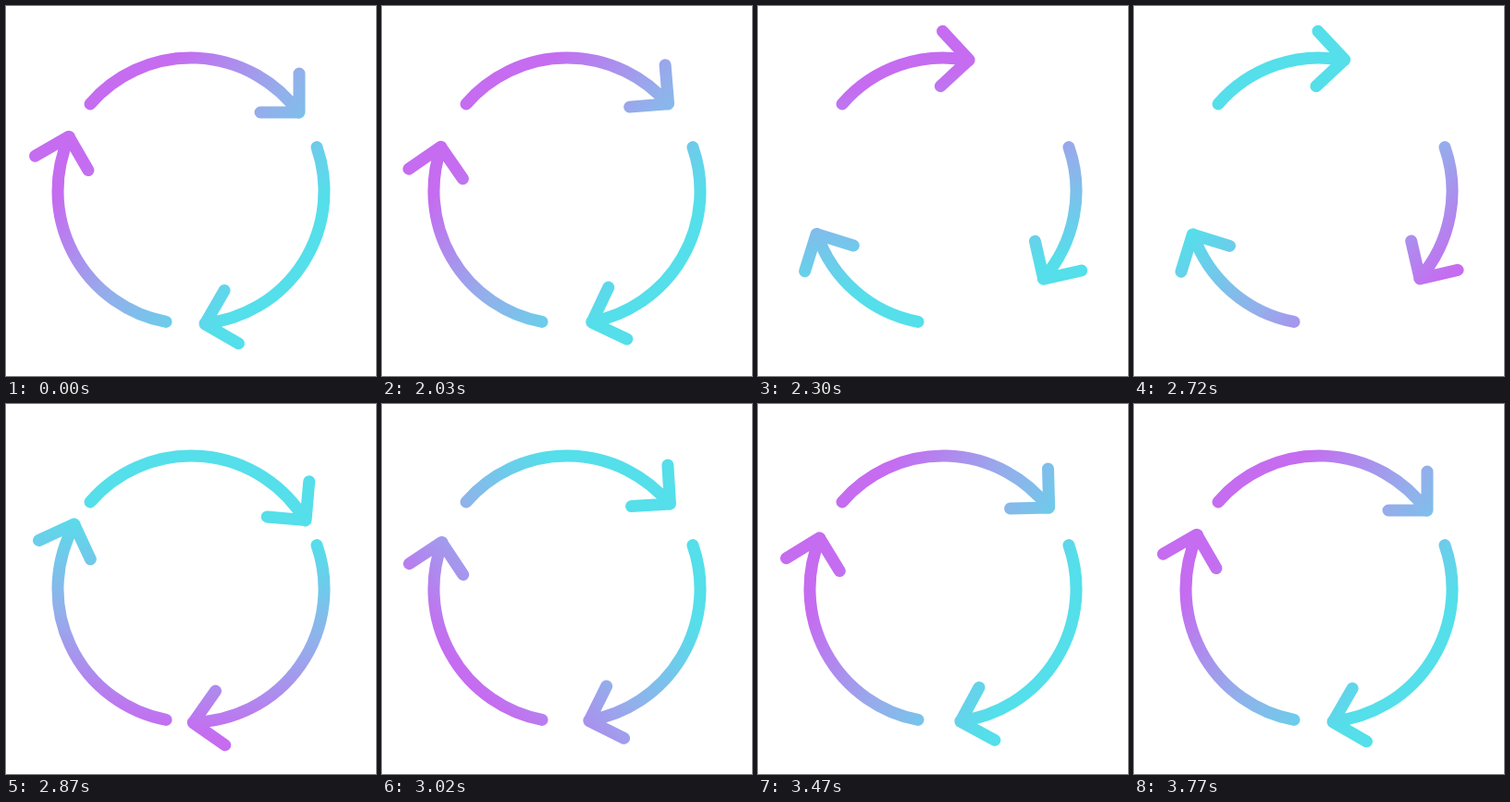
Animation, 400 px wide and 400 px high, one loop 3.83 s. Source, as an HTML page:

```html
<!DOCTYPE html>
<html lang="en">
<head>
<meta charset="utf-8">
<title>Cycle arrows</title>
<style>
  html, body { margin: 0; width: 100%; height: 100%; overflow: hidden; background: #fff; }
  svg { display: block; width: 100%; height: 100%; }
</style>
</head>
<body>
<svg viewBox="0 0 400 400">
  <defs>
    <linearGradient id="tint" gradientUnits="userSpaceOnUse">
      <stop offset="0" stop-color="#c56cf0"/>
      <stop offset=".5" stop-color="#93afeb"/>
      <stop offset="1" stop-color="#54dfea"/>
    </linearGradient>
  </defs>
  <path id="arrows" fill="none" stroke="url(#tint)" stroke-width="13" stroke-linecap="round" stroke-linejoin="round"/>
</svg>
<script>
const LOOP = 3830, HOLD = 2000, STEP = 30, LAST = 59;
const CENTER = 200, RADIUS = 144, TAIL = -139.2, TIP = -36;
const HEAD = [[117, -127], [117, -85], [75, -85]];

const tint = document.getElementById('tint');
const arrows = document.getElementById('arrows');
const rad = deg => deg * Math.PI / 180;
const smooth = (from, to, u) => from + (to - from) * (1 - Math.cos(Math.PI * u)) / 2;

function bezier(x1, y1, x2, y2) {
  const at = (a, b, s) => 3 * (1 - s) ** 2 * s * a + 3 * (1 - s) * s * s * b + s ** 3;
  return u => {
    let lo = 0, hi = 1;
    for (let i = 0; i < 24; i++) {
      const mid = (lo + hi) / 2;
      if (at(x1, x2, mid) < u) lo = mid; else hi = mid;
    }
    return at(y1, y2, (lo + hi) / 2);
  };
}
const pullEase = bezier(.167, .167, .112, 1);
const turnEase = bezier(.3, 0, .42, 1);

// Degrees the heads are away from rest: pull back, spring forward, settle.
function swing(n) {
  if (n <= 0) return 0;
  if (n < 17) return -46.5 * pullEase(n / 17);
  if (n < 24) return smooth(-46.5, -43, (n - 17) / 7);
  if (n < 30) return smooth(-43, 8.5, (n - 24) / 6);
  const d = Math.min(n - 27, 27);
  return 9.6 * (1 - d / 27) * Math.sin(Math.PI * d / 6);
}

function rotated([x, y], deg) {
  const c = Math.cos(rad(deg)), s = Math.sin(rad(deg));
  return (CENTER + x * c - y * s).toFixed(2) + ' ' + (CENTER + x * s + y * c).toFixed(2);
}

function arrow(turn, offset) {
  const tail = rotated([RADIUS, 0], TAIL + turn);
  const tip = rotated([RADIUS, 0], TIP + turn + offset);
  const head = HEAD.map(p => rotated(p, turn + offset)).join('L');
  return `M${tail}A${RADIUS} ${RADIUS} 0 0 1 ${tip}M${head}`;
}

function setTint(n) {
  const r = n <= 0 ? 0 : n >= LAST ? 1 : turnEase(n / LAST);
  const angle = rad(40 + 360 * r);
  const mid = 5 - 55 * Math.sin(Math.PI * r);
  [mid - 112, mid + 112].forEach((d, i) => {
    tint.setAttribute('x' + (i + 1), CENTER + d * Math.cos(angle));
    tint.setAttribute('y' + (i + 1), CENTER + d * Math.sin(angle));
  });
}

function draw(time) {
  const n = Math.min(LAST, Math.max(0, Math.floor((time % LOOP - HOLD) / STEP)));
  const offset = swing(n);
  arrows.setAttribute('d', [0, 120, 240].map(turn => arrow(turn, offset)).join(''));
  setTint(n);
}

const start = performance.now();
function tick() {
  draw(performance.now() - start);
  requestAnimationFrame(tick);
}
tick();
</script>
</body>
</html>
```
